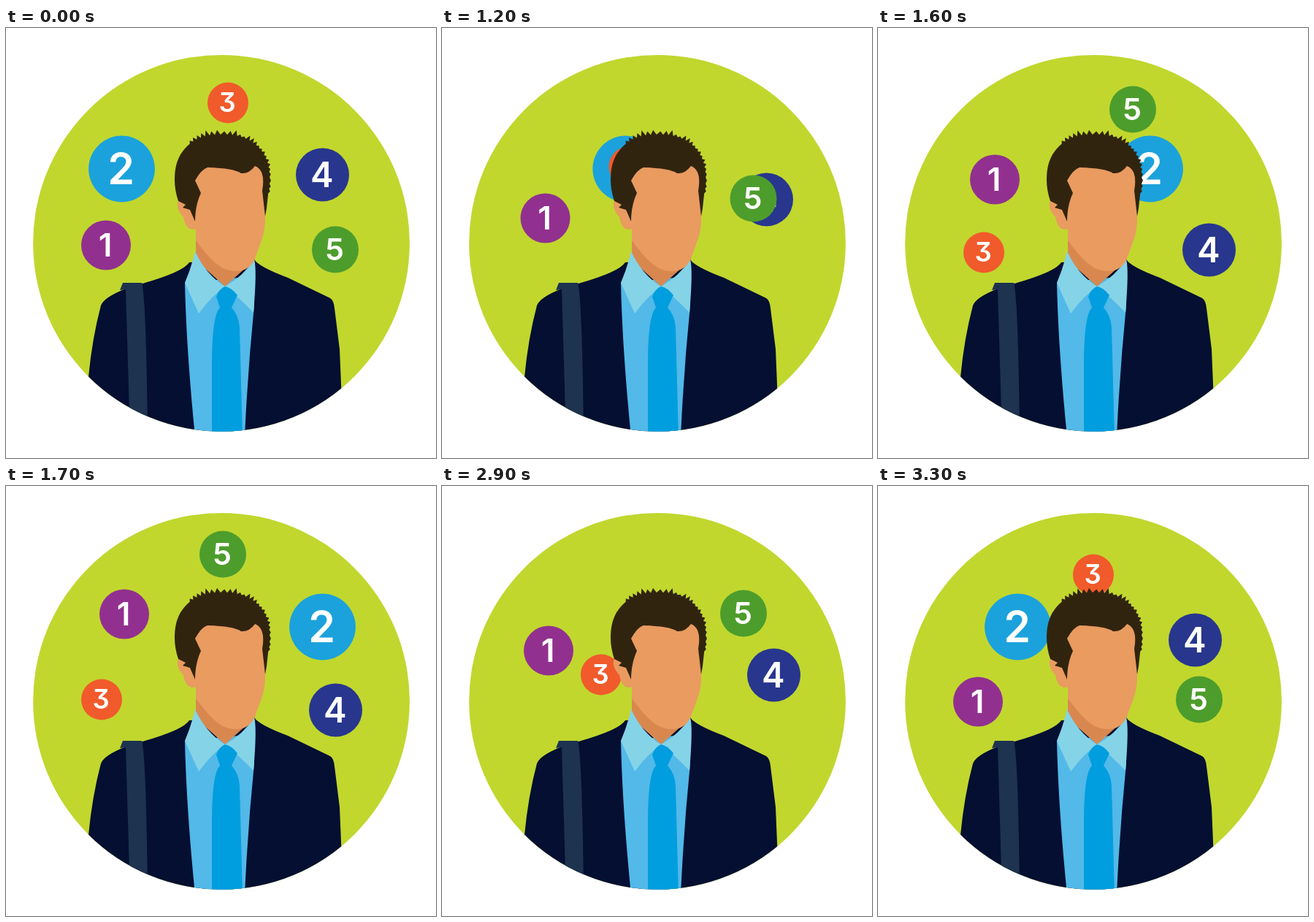
An HTML page for the animation above (3400 ms loop, 589x589 px).

```html
<!DOCTYPE html>
<html lang="en">
<head>
<meta charset="utf-8">
<title>Juggling five tasks</title>
<style>
  html, body { margin: 0; width: 100%; height: 100%; overflow: hidden; background: #fff; }
  svg { display: block; width: 100%; height: 100%; }
  text {
    font-family: Inter, "Open Sans", sans-serif;
    font-weight: 600;
    font-feature-settings: "cv09";
    text-anchor: middle;
    fill: #fff;
  }
</style>
</head>
<body>
<svg viewBox="0 0 589 589">
  <clipPath id="round"><circle cx="295" cy="294.8" r="257.9"/></clipPath>
  <circle cx="295" cy="294.8" r="257.9" fill="#c1d72e"/>
  <g id="discs"></g>

  <g clip-path="url(#round)">
    <!-- jacket and strap -->
    <path fill="#040f32" d="M100 560L113 478Q118 425 130 380Q134 369 164 357L187 350Q243 334 251 321L340 317Q346 327 386 342L444 370Q449 373 450 384L457 440L462 560Z"/>
    <path fill="#1e3350" d="M156 359L160 349H186Q192 370 194 560H170L164 358Z"/>

    <!-- shirt, neck, collar, tie -->
    <path fill="#52b9e9" d="M245 349Q247 440 259 560H327Q331 470 340 380V340Z"/>
    <path fill="#d8884f" d="M260 280V318L300 354L341 317L335 290Z"/>
    <path fill="#85d3e6" d="M259 306Q254 328 245 349L264 391Q280 369 300 354Q274 338 259 306Z"/>
    <path fill="#85d3e6" d="M340 317Q344 330 339 390Q321 371 300 354Q325 340 340 317Z"/>
    <path fill="#009edf" d="M300 354Q292 357 288 368L293 383Q282 394 282 460V560H324L320 410Q319 394 309 383L317 366Q308 355 300 354Z"/>

    <!-- head -->
    <path fill="#e99b60" d="M262 180H355V266C354 284 349 293 342 313C337 328 326 334 312 333C290 332 273 308 260 291V275C250 279 245 270 243 259C236 252 232 241 237 236Z"/>
    <path id="hair" fill="#31240f"/>
  </g>
</svg>

<script>
  const LOOP = 3400, HOLD = 1000, TICK = 100, LAST = 8;

  // each disc moves straight between its points, reached at these steps
  const KEYS = [0, 1, 5, 7, 8];
  const discs = [
    { color: '#92308f', r: 34, path: '137,297.5 137,295.5 146,225.5 160,207.5 162,175.5' },
    { color: '#1ba2dc', r: 45.4, path: '158.5,193 191.5,193 312,193 372.5,193 433.5,193' },
    { color: '#f15a2b', r: 28, path: '304,102.5 295,121.5 218,258.5 145,307.5 131,292.5' },
    { color: '#28368e', r: 36.5, path: '433.5,201 434.5,211 454.5,259 453.5,304 451.5,307' },
    { color: '#4d9d2c', r: 32, path: '451,303.5 440,292.5 413,174.5 349,111.5 297,93.5' }
  ];

  function add(parent, tag, attrs) {
    const el = document.createElementNS('http://www.w3.org/2000/svg', tag);
    for (const key in attrs) el.setAttribute(key, attrs[key]);
    return parent.appendChild(el);
  }

  const layer = document.getElementById('discs');
  discs.forEach((d, i) => {
    const size = d.r * 1.3;
    d.points = d.path.split(' ').map(p => p.split(',').map(Number));
    d.el = add(layer, 'g', {});
    add(d.el, 'circle', { r: d.r, fill: d.color });
    add(d.el, 'text', { x: -0.8, y: size * 0.35, 'font-size': size }).textContent = i + 1;
  });

  // rounded crown, smooth on the left, then tufts over the top and down the right
  function hairPath() {
    const COUNT = 70, SQUARE = 0.87;
    const noise = i => Math.abs(Math.sin(i * 12.9898) * 43758.5453) % 1;
    const bend = v => Math.sign(v) * Math.abs(v) ** SQUARE;
    const crown = [];
    for (let i = 0; i <= COUNT; i++) {
      const a = Math.PI * (1 - 1.08 * i / COUNT);
      const tuft = i % 2 && a < 2.3 ? 0.03 + 0.1 * noise(i) * Math.max(0, Math.sin(a)) : 0;
      const x = 296 + 65 * bend(Math.cos(a)) * (1 + tuft);
      const y = 208 - 62 * bend(Math.sin(a)) * (1 + tuft);
      crown.push(`${x.toFixed(1)} ${y.toFixed(1)}`);
    }
    return `M236 237Q231 222 ${crown.join('L')}L357 247L355 258L351 223Q356 195 341 189`
      + 'Q333 200 322 199Q312 192 276 191Q267 194 259 209L267 226Q259 243 259 265'
      + 'L252 249L242 246L246 242Z';
  }
  document.getElementById('hair').setAttribute('d', hairPath());

  // hold, run forward, hold, run back
  function stepAt(t) {
    const half = LOOP / 2;
    const n = Math.max(0, Math.floor((t % half - HOLD) / TICK) + 1);
    return t < half ? n : LAST - n;
  }

  function place(points, step) {
    const i = Math.max(1, KEYS.findIndex(k => k >= step));
    const part = (step - KEYS[i - 1]) / (KEYS[i] - KEYS[i - 1]);
    return points[i].map((end, axis) => {
      const from = points[i - 1][axis];
      return from + (end - from) * part;
    });
  }

  const start = performance.now();
  function draw() {
    const step = stepAt((performance.now() - start) % LOOP);
    for (const d of discs) d.el.setAttribute('transform', `translate(${place(d.points, step)})`);
    requestAnimationFrame(draw);
  }
  draw();
</script>
</body>
</html>
```
